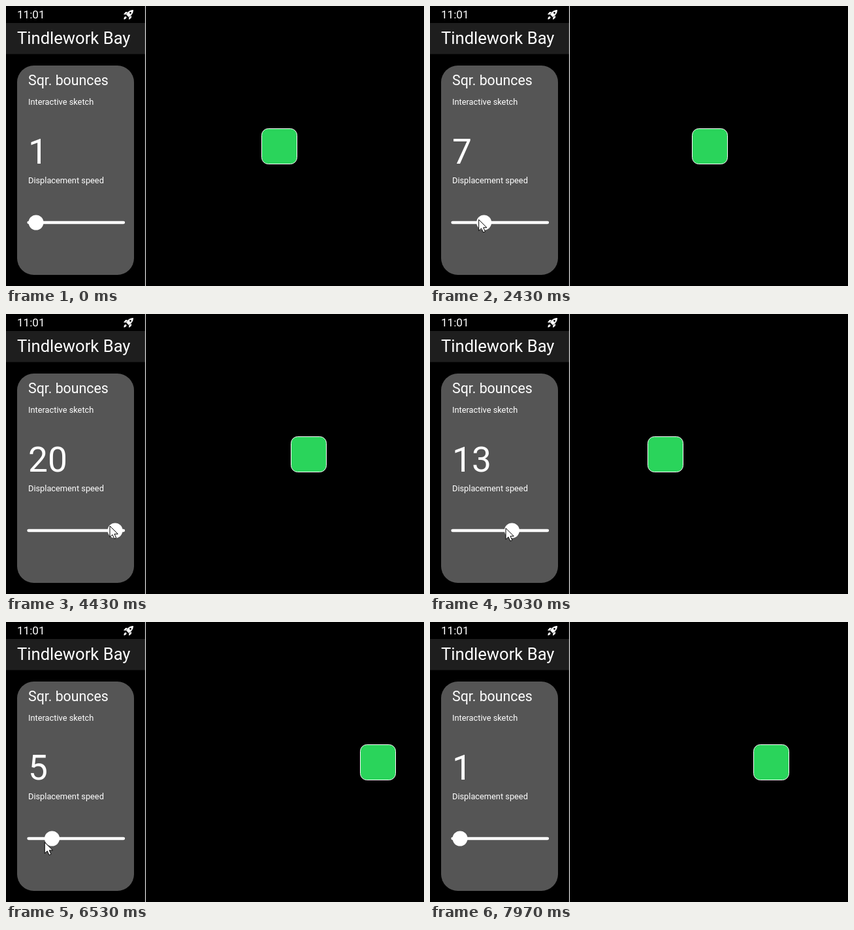
An HTML page that plays this animation: 640x428 px, repeating every 8000 ms.

```html
<!DOCTYPE html>
<html lang="en">
<head>
<meta charset="utf-8">
<title>Square bounces</title>
<style>
  html, body { margin: 0; width: 100%; height: 100%; overflow: hidden; background: #000; }
  svg { display: block; width: 640px; height: 428px; }
  text { font-family: Roboto, sans-serif; fill: #fff; }
</style>
</head>
<body>
<svg viewBox="0 0 640 428">
  <rect width="640" height="428"/>
  <rect id="square" y="187.5" width="54" height="54" rx="10" fill="#2ad45b" stroke="#fff"/>

  <rect y="26" width="213" height="47.5" fill="#1e1e1e"/>
  <rect x="213" width="1" height="428" fill="#fff"/>
  <text x="17" y="19" font-size="17.07">11:01</text>
  <g fill="#fff">
    <path d="M195 6C190 6 186.5 8.5 184 13L188 17C192 14.5 195 11 195 6Z"/>
    <path d="M186.3 9H183L180 13H183.5ZM192 14.8V18L188.2 21V17.5Z"/>
    <path d="M180.5 20.5C180 18 181.5 15.5 183.5 16C185.5 17 184.5 20 180.5 20.5Z"/>
    <circle cx="190.5" cy="10.5" r="1.4" fill="#000"/>
  </g>
  <text x="17" y="58" font-size="25.6">Tindlework Bay</text>

  <rect x="17" y="91" width="179" height="320" rx="25.6" fill="#555"/>
  <text x="34" y="121" font-size="21.33">Sqr. bounces</text>
  <text x="34" y="151" font-size="12.8">Interactive sketch</text>
  <text id="number" x="34" y="241" font-size="53.33">1</text>
  <text x="34" y="271" font-size="12.8">Displacement speed</text>
  <path d="M34.5 331H180" stroke="#fff" stroke-width="4.3" stroke-linecap="round"/>
  <circle id="knob" cy="331" r="11.5" fill="#fff"/>
  <path id="cursor" d="M0 0V17L4 13.3L6.8 19.5L9.8 18.2L7 12.2H12.3Z" fill="#fff" stroke="#000"/>
</svg>
<script>
const LOOP = 8000, FPS = 30;
const LEFT = 214, SPAN = 372, START = 177.4;
const STEP = 2.133; // pixels per frame at speed 1
const KNOB_MIN = 46, KNOB_MAX = 168, MAX_SPEED = 20;

// The dragged speed drives the knob, the number and the square: [frame, speed]
const speedKeys = [
  [0, 1], [34, 1], [43, 2], [76, 7.18], [101, 16.57], [117, 17.5],
  [134, 20], [150, 13.43], [170, 12.21], [183, 7.14], [196, 4.82], [206.7, 1], [240, 1]
];
// [frame, y]
const cursorKeys = [[0, 360], [38, 328], [134, 324], [207, 339], [226, 345], [239, 360]];

function lerp(keys, frame) {
  let i = 1;
  while (i < keys.length - 1 && keys[i][0] < frame) i++;
  const [f0, v0] = keys[i - 1], [f1, v1] = keys[i];
  return v0 + (v1 - v0) * Math.min(1, (frame - f0) / (f1 - f0));
}

// Area under the speed curve.
function distance(frame) {
  let sum = 0;
  for (let i = 1; i < speedKeys.length && speedKeys[i - 1][0] < frame; i++) {
    const [from, speed] = speedKeys[i - 1];
    const to = Math.min(frame, speedKeys[i][0]);
    sum += (to - from) * (speed + lerp(speedKeys, to)) / 2;
  }
  return START + STEP * sum;
}

function bounce(d) {
  const m = d % (2 * SPAN);
  return LEFT + SPAN - Math.abs(m - SPAN);
}

function knobX(frame) {
  const part = (lerp(speedKeys, frame) - 1) / (MAX_SPEED - 1);
  return KNOB_MIN + (KNOB_MAX - KNOB_MIN) * part;
}

const [square, number, knob, cursor] =
  ["square", "number", "knob", "cursor"].map(id => document.getElementById(id));

function draw(time) {
  const frame = Math.floor((time % LOOP + 4) * FPS / 1000);
  square.setAttribute("x", Math.round(bounce(distance(frame))) + 0.5);
  knob.setAttribute("cx", knobX(frame));
  number.textContent = Math.round(lerp(speedKeys, frame));

  // The pointer leads the knob by a frame and slips in and out at the left edge.
  const y = lerp(cursorKeys, frame);
  const x = knobX(frame + 1) - 9 - 3 * Math.max(0, y - 339);
  cursor.setAttribute("transform", `translate(${x} ${y})`);
}

const start = performance.now();
function tick() {
  draw(performance.now() - start);
  requestAnimationFrame(tick);
}
tick();
</script>
</body>
</html>
```
